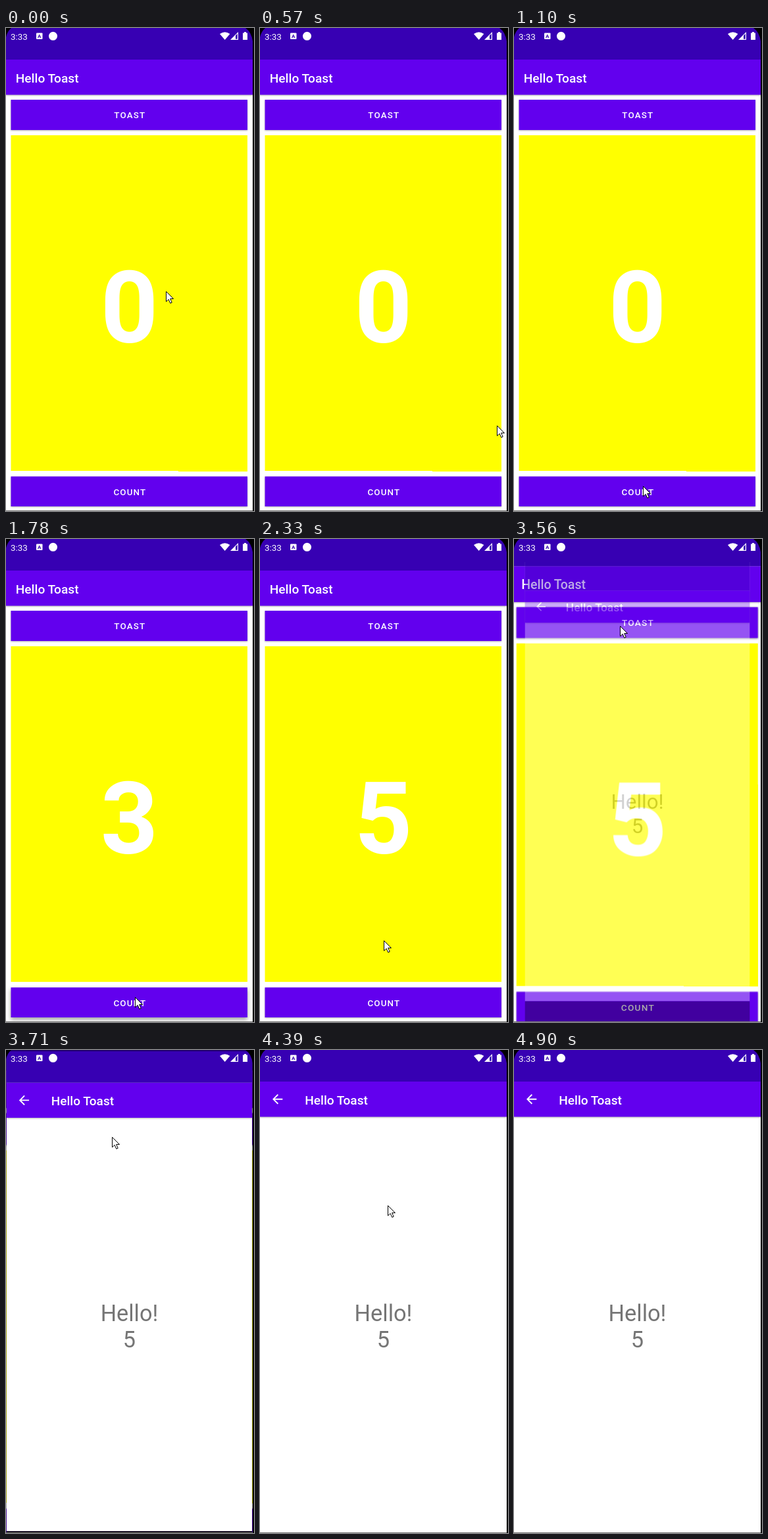
An HTML page that plays this animation: 377 by 734 pixels, repeating every 5280 ms.

```html
<!DOCTYPE html>
<html lang="en">
<head>
<meta charset="utf-8">
<title>Hello Toast</title>
<style>
  html, body { margin: 0; width: 100%; height: 100%; overflow: hidden; background: #fff; }
  svg { display: block; }
  #stage { width: 377px; height: 734px; font-family: Roboto, sans-serif; fill: #fff; }

  .dark { fill: #3700b3; }
  .main { fill: #6200ee; }
  .bar { filter: drop-shadow(0 1px 1px rgba(0, 0, 0, .3)); }
  .title { font-size: 19.1px; font-weight: 500; }
  .label { font-size: 13.37px; font-weight: 500; letter-spacing: .0893em; text-anchor: middle; }
  .digits { font-size: 152.8px; font-weight: 700; text-anchor: middle; }
  .hello { font-size: 34.4px; fill: #757575; text-anchor: middle; }

  /* Everything shares one loop with hard steps. */
  .anim { animation: 5280ms step-end infinite; }
  #home { animation-name: home; transform-origin: 187.5px 371px; }
  #dim { animation-name: dim; }
  #reply { animation-name: reply; }
  #count { animation-name: count; }
  #pressCount { animation-name: press-count; }
  #pressToast { animation-name: press-toast; }
  #cursor { animation-name: cursor; }

  @keyframes home {
    0% { transform: none; }
    67.42% { transform: scale(1.021); }
    70.26%, 100% { transform: scale(1.05); }
  }
  @keyframes dim {
    0% { opacity: 0; }
    70.26%, 100% { opacity: .38; }
  }
  @keyframes reply {
    0% { opacity: 0; transform: none; }
    67.42% { opacity: .33; transform: translate(16.7px, 34.7px) scale(.911); }
    70.26% { opacity: 1; transform: translate(.9px, 2px) scale(.995); }
    72.72%, 100% { opacity: 1; transform: none; }
  }
  @keyframes count {
    0% { transform: none; }
    28.97% { transform: translateY(-160px); }
    31.43% { transform: translateY(-320px); }
    33.71% { transform: translateY(-480px); }
    36.55% { transform: translateY(-640px); }
    41.66%, 100% { transform: translateY(-800px); }
  }
  @keyframes press-count {
    0% { filter: drop-shadow(0 1px 1px rgba(0, 0, 0, .3)); }
    28.97% { filter: drop-shadow(0 2px 2px rgba(0, 0, 0, .35)); }
    31.43% { filter: drop-shadow(0 3px 3px rgba(0, 0, 0, .4)); }
    44.12%, 100% { filter: drop-shadow(0 1px 1px rgba(0, 0, 0, .3)); }
  }
  @keyframes press-toast {
    0% { filter: drop-shadow(0 1px 1px rgba(0, 0, 0, .3)); }
    59.09%, 100% { filter: drop-shadow(0 1px 1.5px rgba(0, 0, 0, .42)); }
  }
  @keyframes cursor {
    0% { transform: translate(243px, 400px); }
    10.79% { transform: translate(360px, 604px); }
    13.44% { transform: translate(322px, 650px); }
    15.71% { transform: translate(258px, 686px); }
    17.99% { transform: translate(209px, 694px); }
    20.83% { transform: translate(196px, 696px); }
    44.12% { transform: translate(188px, 610px); }
    46.4% { transform: translate(148px, 340px); }
    48.67% { transform: translate(114px, 157px); }
    51.32% { transform: translate(146px, 140px); }
    53.78% { transform: translate(161px, 132px); }
    83.14% { transform: translate(194px, 236px); }
    85.41% { transform: translate(268px, 452px); }
    87.68% { transform: translate(330px, 640px); }
    89.96% { transform: translate(359px, 725px); }
    92.8%, 100% { transform: translate(400px, 760px); }
  }
</style>
</head>
<body>
<svg id="stage" viewBox="0 0 377 734">
  <g id="home" class="anim">
    <rect width="375" height="734"/>
    <rect class="main bar" y="48" width="375" height="53.5"/>
    <rect class="dark" width="375" height="48"/>
    <text class="title" x="14.8" y="82.5">Hello Toast</text>
    <rect id="pressToast" class="main anim" x="7.5" y="109" width="359.5" height="46"/>
    <text class="label" x="188.4" y="137.4">TOAST</text>
    <rect x="7.5" y="163" width="359.5" height="510" fill="#ff0"/>
    <svg x="100" y="340" width="175" height="160">
      <g id="count" class="digits anim">
        <text x="87.5" y="138.2">0</text>
        <text x="87.5" y="298.2">1</text>
        <text x="87.5" y="458.2">2</text>
        <text x="87.5" y="618.2">3</text>
        <text x="87.5" y="778.2">4</text>
        <text x="87.5" y="938.2">5</text>
      </g>
    </svg>
    <rect id="pressCount" class="main anim" x="7.5" y="681.5" width="359.5" height="45.5"/>
    <text class="label" x="188.4" y="709.6">COUNT</text>
  </g>

  <rect id="dim" class="anim" width="377" height="734" fill="#000"/>

  <g id="reply" class="anim">
    <rect width="375" height="733"/>
    <rect y="733" width="375" height="46" fill="#000"/>
    <rect class="main bar" y="48" width="375" height="53.5"/>
    <rect class="dark" width="375" height="48"/>
    <path transform="translate(15.2 63.3) scale(.955)" d="M20 11H7.83l5.59-5.59L12 4l-8 8 8 8 1.41-1.41L7.83 13H20z"/>
    <text class="title" x="68.2" y="82.5">Hello Toast</text>
    <text class="hello" x="187.5" y="412">Hello!</text>
    <text class="hello" x="187.5" y="452.3">5</text>
  </g>

  <!-- status bar -->
  <text x="7" y="17.5" font-size="13.4">3:33</text>
  <rect x="46" y="7.5" width="9.5" height="9.5" rx="1"/>
  <text class="dark" x="50.75" y="15.2" font-size="8" font-weight="700" text-anchor="middle">A</text>
  <circle cx="71.5" cy="12.3" r="6.5"/>
  <path d="M325 9Q332.7 3.5 340.4 9L332.7 18z"/>
  <path d="M341 18L353 6V18z"/>
  <path class="dark" d="M349 11.6L351.8 8.8V16.8H349z"/>
  <path d="M360 7.4H362V6H365V7.4H367V18H360z"/>

  <!-- device edge -->
  <g fill="#000">
    <path d="M0 0H8Q2 5 0 14z"/>
    <path d="M364 0H377V734H375V20Q373 6 364 0z"/>
    <rect y="733" width="375" height="1" fill="#777"/>
  </g>

  <g id="cursor" class="anim">
    <path d="M.5 .5V15.8L4.2 12.4L6.8 18.3L9.2 17.2L6.7 11.5H11.5z" stroke="#000"/>
  </g>
</svg>
</body>
</html>
```
